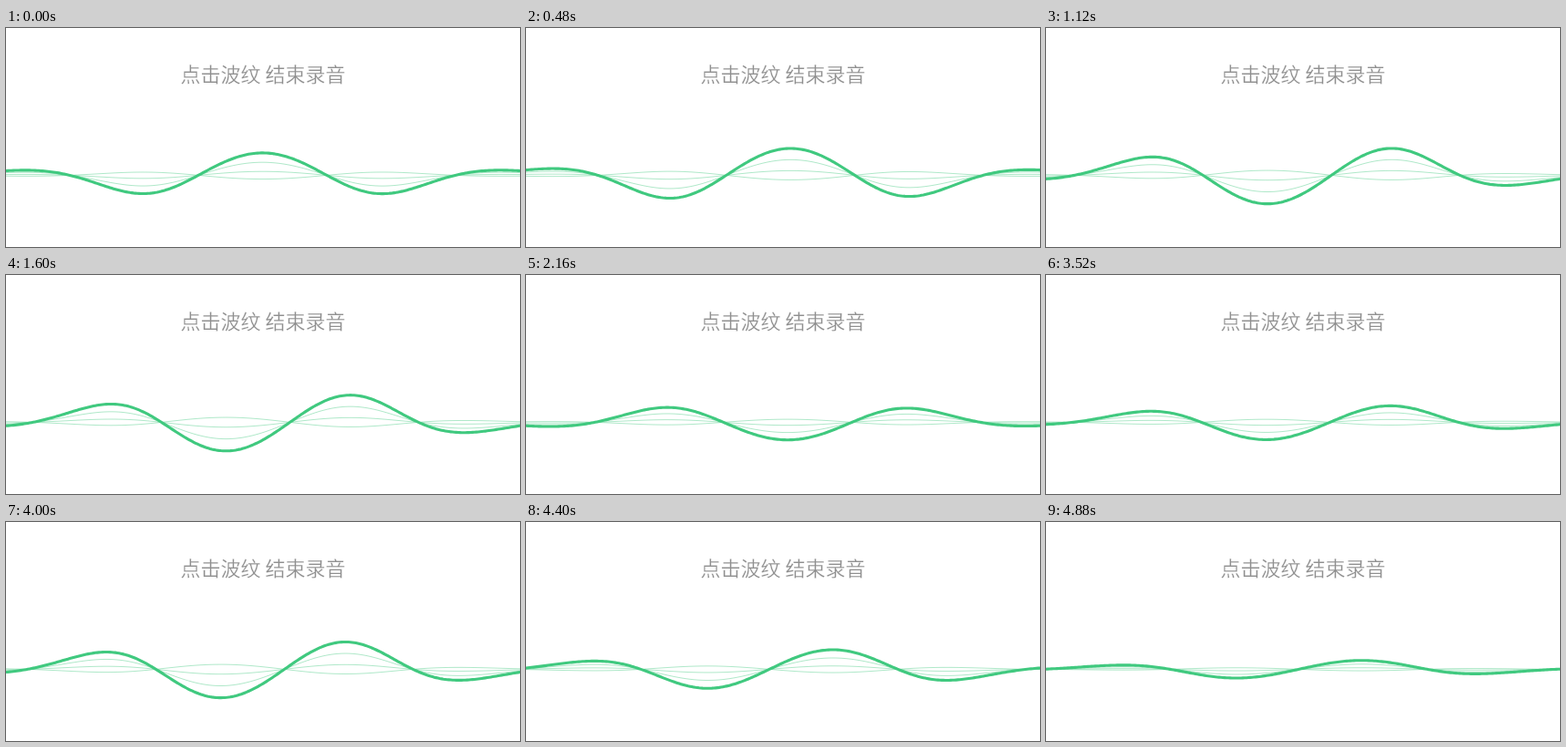
These frames come from a looping animation (564 px wide and 240 px high, 4.96 s). An HTML page:

```html
<!DOCTYPE html>
<html lang="zh-CN">
<head>
<meta charset="utf-8">
<title>录音波纹</title>
<style>
html, body { margin: 0; width: 100%; height: 100%; overflow: hidden; background: #fff; }
svg { display: block; }
text {
  font: 300 22px "Noto Sans CJK SC", "Noto Sans CJK", sans-serif;
  fill: #8f8f8f; stroke: #fff; stroke-width: 0.25px; text-anchor: middle;
}
path { fill: none; stroke: #40c97f; }
</style>
</head>
<body>
<svg width="564" height="240" viewBox="0 0 564 240">
  <text x="282" y="58.5">点击波纹 结束录音</text>
  <g id="waves"></g>
</svg>
<script>
const WIDTH = 564, MID = WIDTH / 2, BASE = 161.4, PERIOD = MID;
const STEP = 80, LOOP = 4960, SPEED = 47.3;

// Key points of the voice level and of the small lead or lag of the wave
const KEYS = [
  { step: 0, volume: 24.5, drift: 0 },
  { step: 4, volume: 31, drift: 5 },
  { step: 6, volume: 29.4, drift: 7 },
  { step: 14, volume: 31.3, drift: 4 },
  { step: 21, volume: 31.5, drift: 0 },
  { step: 27, volume: 19.3, drift: -2.5 },
  { step: 38, volume: 10.3, drift: 1 },
  { step: 42, volume: 15, drift: -4 },
  { step: 50, volume: 31.3, drift: -14.5 },
  { step: 61, volume: 9.8, drift: 1 }
];

// Three faint lines, then the bold one
const LINES = [-0.17, 0.17, 0.58, 1].map(gain => {
  const path = document.createElementNS('http://www.w3.org/2000/svg', 'path');
  path.setAttribute('stroke-width', gain === 1 ? 3.1 : 1);
  path.setAttribute('stroke-opacity', gain === 1 ? 1 : 0.42);
  document.getElementById('waves').appendChild(path);
  return { gain, path };
});

function keyed(name, step) {
  const i = Math.max(1, KEYS.findIndex(key => key.step >= step));
  const a = KEYS[i - 1], b = KEYS[i];
  return a[name] + (b[name] - a[name]) * (step - a.step) / (b.step - a.step);
}

// Bell-shaped falloff, 1 in the middle and 0.2 at the edges
function envelope(x) {
  const u = 2 * (x - MID) / MID;
  return 4 / (4 + u ** 4);
}

function wave(crest, height) {
  const points = [];
  for (let x = -4; x <= WIDTH + 4; x += 2) {
    const y = BASE - height * envelope(x) * Math.cos(2 * Math.PI * (x - crest) / PERIOD);
    points.push(x + ' ' + y.toFixed(2));
  }
  return 'M' + points.join('L');
}

function draw(ms) {
  const step = Math.floor((ms % LOOP) / STEP);
  const crest = MID - 0.5 + SPEED * step + keyed('drift', step);
  const volume = keyed('volume', step);
  for (const { gain, path } of LINES) path.setAttribute('d', wave(crest, volume * gain));
}

const start = performance.now();
function tick() {
  draw(performance.now() - start);
  requestAnimationFrame(tick);
}
draw(0);
requestAnimationFrame(tick);
</script>
</body>
</html>
```
